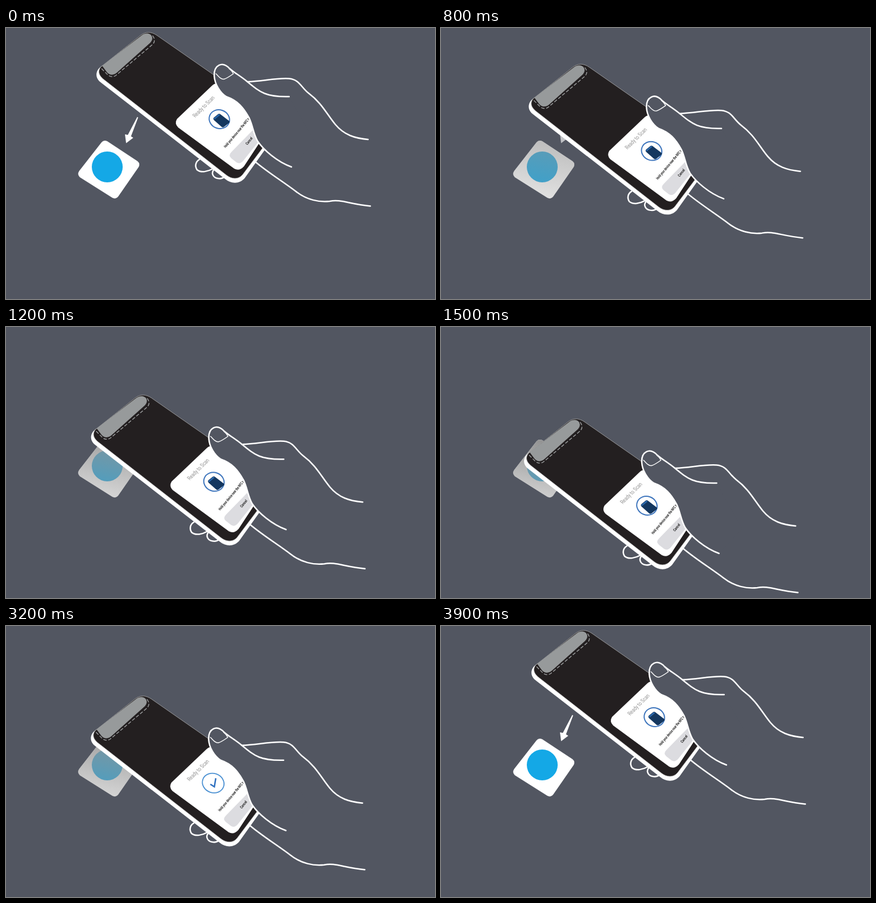
Recreate the animation shown at these times as an HTML page. Size 750 px wide and 474 px high, loop 4400 ms.

```html
<!DOCTYPE html>
<html lang="en">
<head>
<meta charset="utf-8">
<title>Phone scanning a tag</title>
<style>
  html, body { margin: 0; width: 100%; height: 100%; overflow: hidden; background: #525661; }
  svg { display: block; width: 100vw; height: 100vh; }
  text { font-family: Roboto, sans-serif; }
  .line { fill: none; stroke: #fff; stroke-width: 2.5; stroke-linecap: round; stroke-linejoin: round; }
</style>
</head>
<body>
<svg viewBox="0 0 750 474">
  <defs>
    <linearGradient id="shade" gradientUnits="userSpaceOnUse" x1="186" y1="198" x2="166" y2="294">
      <stop offset="0" stop-color="#929292"/>
      <stop offset="1" stop-color="#929292" stop-opacity=".45"/>
    </linearGradient>
    <path id="tagShape" d="M167 200 Q171 195 177 198 L230 233 Q235 237 232 243 L196 295 Q192 300 186 297 L129 261 Q124 256 128 250 Z"/>
  </defs>

  <use href="#tagShape" fill="#fff"/>
  <circle cx="177" cy="243" r="27" fill="#14a8e6"/>
  <use id="shadow" href="#tagShape" fill="url(#shade)"/>
  <path id="arrow" fill="#fff" d="M229.5 155.5 L231 156.5 L218.5 189.5 L222.5 192 L210 201.5 L208 186 L213 187 Z"/>

  <g id="phone">
    <!-- fingers behind the phone -->
    <path class="line" d="M338 230 C331 234 330 242 334 248 C341 254 353 251 362 246"/>
    <path class="line" d="M363 248 C358 255 363 262 370 263 C375 264 379 263 382 260"/>

    <!-- body and face -->
    <path fill="#fff" d="M168 66 C157 73 155 85 163 93 L168 97 L383 264 C394 273 408 273 417 263 L454 211 L430 190 L250 60 Z"/>
    <path fill="#231f20" stroke="#aaa" stroke-width=".8" d="M166 68 L235 13 C244 6 254 6 264 13 L366 84 L478 164 L450 208 L414 256 C407 265 395 265 385 257 L171 90 C162 83 160 75 166 68 Z"/>
    <path fill="#979a9b" d="M168 66 L237 13 C244 8 251 9 254 13 C257 17 256 22 252 26 L195 77 C189 83 182 83 177 78 Z"/>
    <path fill="none" stroke="#a5a7a8" stroke-width="1.3" stroke-dasharray="6 3" d="M167 71 L178 82 C182 86 188 86 192 83 L256 29 C261 24 261 18 254 11"/>

    <!-- scan card -->
    <path fill="#fff" d="M299 159 L360 101 Q366 95 373 98 L460 175 L416 242 Q408 251 399 246 L301 174 Q294 167 299 159 Z"/>
    <path fill="#dcdce0" d="M394 217 L434 176 L446 193 L415 232 Q409 239 403 235 L394 228 Q388 223 394 217 Z"/>
    <text transform="matrix(.52 -.52 .78 .6 331 157)" font-size="10.5" fill="#929292">Ready to Scan</text>
    <text transform="matrix(.42 -.5 .78 .6 384 210)" font-size="7" font-weight="700" fill="#222">Hold your device near the NFC tag</text>
    <text transform="matrix(.45 -.56 .78 .6 422 205)" font-size="7" font-weight="700" fill="#222">Cancel</text>

    <g id="phoneIcon">
      <ellipse cx="373" cy="159.5" rx="18" ry="16.2" transform="rotate(20 373 159.5)" fill="#fff" stroke="#3f76bd" stroke-width="2"/>
      <path fill="#14375f" d="M363 157 L371 150.5 Q373 149.5 375 151 L390 162.5 Q392 164 390 166 L381 173 Q379 174.5 377 173 L363.5 161 Q361.5 159 363 157 Z"/>
      <path fill="none" stroke="#2a68ad" stroke-width="2.5" stroke-linecap="round" d="M364.5 158.5 L372.5 152"/>
    </g>
    <g id="checkIcon">
      <ellipse cx="372" cy="160" rx="19.2" ry="16.8" transform="rotate(20 372 160)" fill="#fff" stroke="#4a90d2" stroke-width="1.8"/>
      <path fill="none" stroke="#2f70bf" stroke-width="2.5" d="M367 162 L374 166.5 L376.5 151.5"/>
    </g>

    <!-- hand in front -->
    <path fill="#525661" d="M364 84 C365 98 374 113 385 120 C405 127 415 139 425 157 C432 172 432 184 440 198 C450 213 474 234 499 243 L540 200 L495 120 C455 121 445 113 422 94 C410 84 400 79 391 71 C378 58 363 65 364 84 Z"/>
    <path class="line" d="M495 120 C455 121 445 113 422 94 C410 84 400 79 391 71 C378 57 363 65 364 84 C365 98 374 113 385 120 C405 127 415 139 425 157 C432 172 432 184 440 198 C450 213 474 234 499 243"/>
    <path class="line" d="M422 94 C450 93 472 87 495 88.5 C513 90 516 104 529 114 C552 131 561 151 576 169 C591 187 610 193 633 195"/>
    <path class="line" d="M437 235 C460 254 486 270 507 286 C526 301 548 305 566 303 C585 299 600 308 637 311.5"/>
    <path class="line" style="stroke-width:1.4" d="M367 80 C371 83 374 90 381 89.5 C386 88 392 84 397.5 80 Q395 75 390 71"/>
  </g>
</svg>
<script>
  const LOOP = 4400, STEP = 100;
  const TRAVEL = { x: -13, y: 153 };
  const el = id => document.getElementById(id);
  const [phone, shadow, arrow, phoneIcon, checkIcon] =
    ["phone", "shadow", "arrow", "phoneIcon", "checkIcon"].map(el);

  // Progress from 0 to 1 in equal jumps, the first one at `start`.
  const steps = (time, start, count) =>
    Math.min(count, Math.max(0, Math.floor((time - start) / STEP) + 1)) / count;

  const fade = (node, opacity) => node.setAttribute("opacity", opacity);

  function draw(now) {
    const time = now % LOOP;
    const lower = steps(time, 500, 11);
    const reset = steps(time, 3700, 3);
    const depth = lower - steps(time, 3200, 4);
    const checked = steps(time, 2000, 3) - reset;

    phone.setAttribute("transform", `translate(${TRAVEL.x * depth} ${TRAVEL.y * depth})`);
    fade(shadow, Math.sqrt(depth));
    fade(arrow, 1 - lower + reset);
    fade(phoneIcon, 1 - checked);
    fade(checkIcon, checked);
    requestAnimationFrame(draw);
  }

  draw(performance.now());
</script>
</body>
</html>
```
